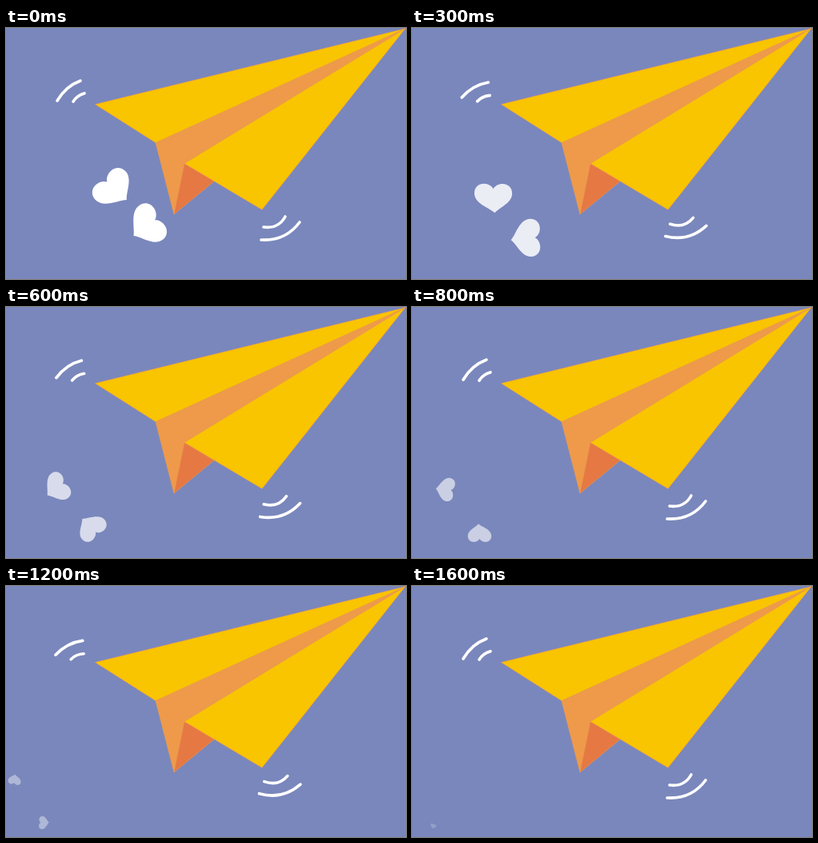
Write an HTML page that moves like this. It is 500x314 px and loops after 1700 ms.

```html
<!DOCTYPE html>
<html lang="en">
<head>
<meta charset="utf-8">
<title>Paper plane</title>
<style>
html, body { margin: 0; width: 100%; height: 100%; overflow: hidden; background: #7a87bc; }
svg { display: block; width: 100%; height: 100%; }
</style>
</head>
<body>
<svg viewBox="0 0 500 314">
  <defs>
    <path id="heart" d="M2.7 27C-5 20-26 15-26 0C-26-8-20-13-13-13C-7-13-2-10 0-6C2-10 7-13 13-13C20-13 26-8 26 0C26 13 9 19 2.7 27Z"/>
  </defs>
  <rect width="500" height="314" fill="#7a87bc"/>
  <g stroke="#ee9a4a" stroke-width=".6" stroke-linejoin="round">
    <path d="M187 143.5L499 .8L223 169.5L210 233Z" fill="#ee9a4a"/>
    <path d="M223 169.5L260.5 191.5L210 233Z" fill="#e67843"/>
    <path d="M111.5 95.5L499 .8L187 143.5Z" fill="#f9c400"/>
    <path d="M223 169.5L499 .8L320 227.3Z" fill="#f9c400"/>
  </g>
  <g fill="none" stroke="#fff" stroke-width="3.6" stroke-linecap="round">
    <path id="left" d="M64 91Q74.5 73 93 66M84 92Q88.5 84.5 98 81.7"/>
    <path id="right" d="M322 249Q340.5 251.5 349 236M319 265Q349 267 367 243"/>
  </g>
  <g fill="#fff">
    <use id="upper" href="#heart"/>
    <use id="lower" href="#heart"/>
  </g>
</svg>
<script>
const LOOP = 1700, STEP = 100, SWING = 800, END = 1600;
const { PI, sin, cos, exp } = Math;
const get = id => document.getElementById(id);

// Wind lines rock about a pivot
const lines = [
  { el: get("left"), pivot: "84 79.5", angle: 13 },
  { el: get("right"), pivot: "343 250.5", angle: 12 }
];

// Each heart drifts left and down with a sway, while it spins ever faster
const hearts = [
  { el: get("upper"), x: 130.5, y: 197, drift: 137, drop: 63, sway: -3, period: 800, turn: -43, spin: 329, gain: 1.2 },
  { el: get("lower"), x: 181, y: 243.5, drift: 155, drop: 56, sway: 15, period: 3200, turn: 58, spin: 322, gain: 1.4 }
];

function drawHeart(h, t) {
  const u = t / END;
  const x = h.x - h.drift * sin(PI / 2 * t / LOOP) ** 1.2;
  const y = h.y + h.drop * u + h.sway * sin(2 * PI * t / h.period);
  const turn = h.turn + h.spin * u ** h.gain;
  const size = exp(-((t / 1100) ** 1.8));
  h.el.setAttribute("transform", `translate(${x} ${y}) rotate(${turn}) scale(${size})`);
  h.el.setAttribute("opacity", 1 - t / 2000);
}

function draw(t) {
  const swing = (1 - cos(2 * PI * t / SWING)) / 2;
  for (const { el, pivot, angle } of lines) {
    el.setAttribute("transform", `rotate(${angle * swing} ${pivot})`);
  }
  for (const h of hearts) drawHeart(h, t);
}

const start = performance.now();
function tick() {
  const t = (performance.now() - start) % LOOP;
  draw(Math.floor(t / STEP) * STEP);
  requestAnimationFrame(tick);
}
tick();
</script>
</body>
</html>
```
